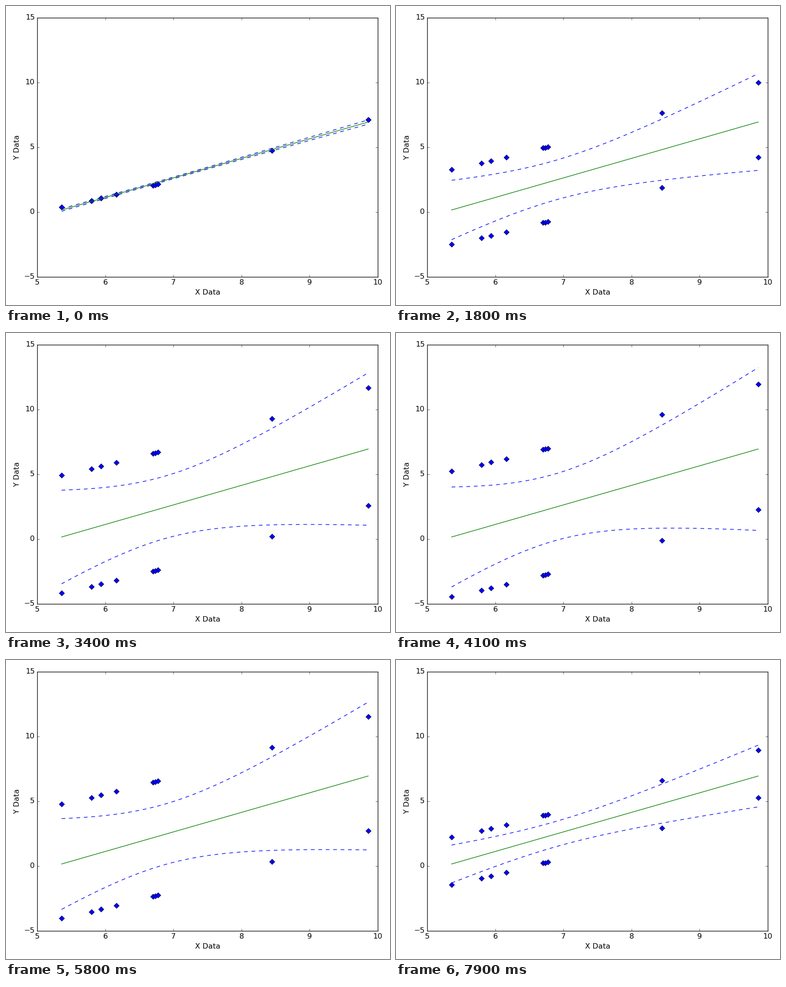
These frames come from a looping animation (849x660 px, 8 s). A matplotlib script:

```python
import numpy as np
import matplotlib.pyplot as plt
from matplotlib.animation import FuncAnimation

W, H, DPI = 849, 660, 96
PT = 98.55 / DPI  # scale of all point sizes
FRAMES, STEP_MS = 80, 100
SPREAD = 4.9      # largest distance of the points from their base values
T_95 = 2.12       # two-sided 95 % Student t for 16 degrees of freedom

base_x = np.array([5.358, 5.796, 5.935, 6.16, 6.7, 6.73, 6.775, 8.445, 9.86])
base_y = np.array([0.395, 0.885, 1.07, 1.345, 2.07, 2.09, 2.15, 4.755, 7.11])
data_x = np.tile(base_x, 2)

slope, intercept = np.polyfit(base_x, base_y, 1)
line_x = np.linspace(base_x[0], base_x[-1], 120)
line_y = slope * line_x + intercept
mean_x = data_x.mean()
leverage = np.sqrt(1 / data_x.size + (line_x - mean_x) ** 2
                   / np.sum((data_x - mean_x) ** 2))

plt.style.use("classic")
plt.rcParams.update({"font.family": "DejaVu Sans", "font.size": 12 * PT})

fig = plt.figure(figsize=(W / DPI, H / DPI), dpi=DPI, facecolor="white")
left, right, top, bottom = 69, 822, 25.7, 598
ax = fig.add_axes([left / W, 1 - bottom / H,
                   (right - left) / W, (bottom - top) / H])
ax.set_xlim(5, 10)
ax.set_ylim(-5, 15)
ax.set_xticks(range(5, 11))
ax.set_yticks(range(-5, 16, 5))
ax.tick_params(length=4 * PT, pad=4 * PT)
ax.set_xlabel("X Data", labelpad=5 * PT)
ax.set_ylabel("Y Data", labelpad=5.6 * PT)

points, = ax.plot([], [], "bD", markersize=6 * PT, zorder=1)
ax.plot(line_x, line_y, "g-", linewidth=PT, zorder=2)
edges = [ax.plot([], [], "b", linewidth=PT, dashes=(6 * PT, 6 * PT),
                 zorder=2)[0] for _ in range(2)]


def update(frame):
    offset = SPREAD * np.sin(np.radians(2 * frame))
    data_y = np.concatenate([base_y + offset, base_y - offset])
    points.set_data(data_x, data_y)

    # confidence band of the fitted line
    residual = data_y - (slope * data_x + intercept)
    error = np.sqrt(np.sum(residual ** 2) / (data_x.size - 2))
    half = T_95 * error * leverage
    for edge, y in zip(edges, (line_y + half, line_y - half)):
        edge.set_data(line_x, y)
    return [points, *edges]


anim = FuncAnimation(fig, update, frames=FRAMES, interval=STEP_MS,
                     repeat=True, repeat_delay=0)
plt.show()
```
